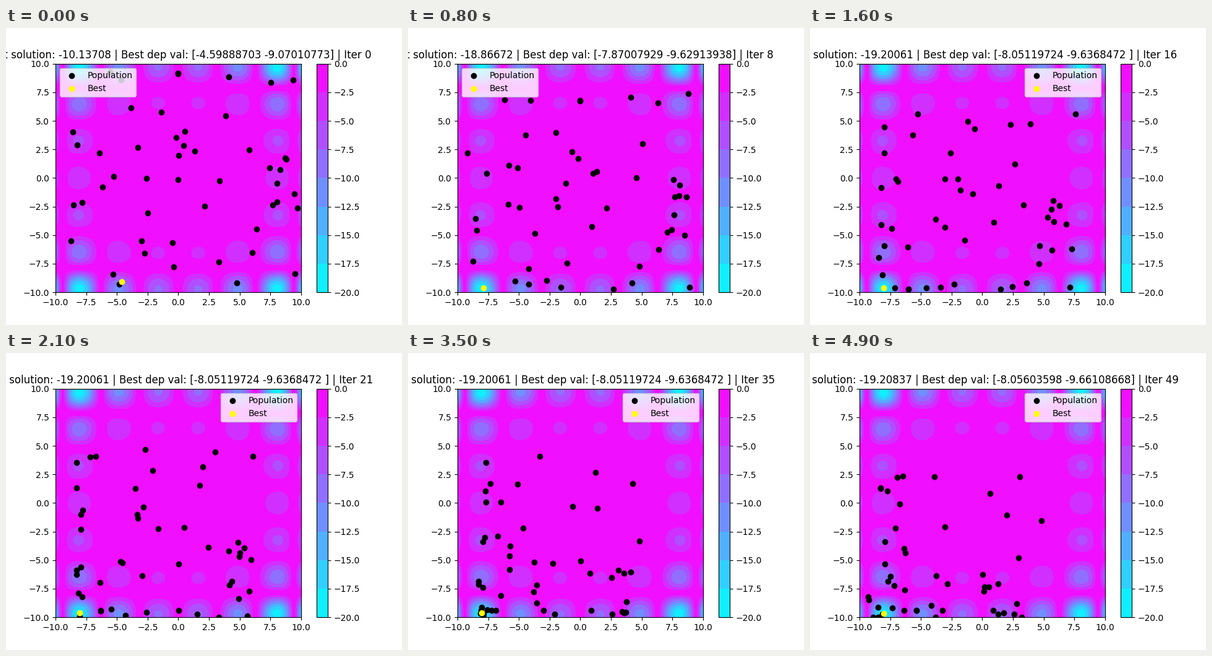
A matplotlib script for the animation above (5 s loop, 640 by 480 pixels).

```python
import matplotlib.pyplot as plt
import numpy as np
from matplotlib.animation import FuncAnimation

FRAMES = 50
DOTS = 50
STEP = 0.3

# (first iteration, best value, best position)
BESTS = [
    (0, -10.13708, (-4.59888703, -9.07010773)),
    (8, -18.86672, (-7.87007929, -9.62913938)),
    (11, -19.20061, (-8.05119724, -9.6368472)),
    (46, -19.20837, (-8.05603598, -9.66108668)),
]


def holder_table(x, y):
    return -np.abs(np.sin(x) * np.cos(y)
                   * np.exp(np.abs(1 - np.hypot(x, y) / np.pi)))


def best_at(i):
    return [b for b in BESTS if b[0] <= i][-1]


def simulate():
    """Step every dot towards the best, with wrong turns that grow commoner."""
    rng = np.random.default_rng(4)
    dots = rng.uniform(-10, 10, (DOTS, 2))
    dots[0] = np.array(BESTS[0][2]) - 0.2  # the dot that found the first best
    path = [dots]
    for i in range(1, FRAMES):
        wrong = 0.05 + 0.37 * i / FRAMES
        # The sideways pull stays weak until a second best is found.
        chance = (0.4, wrong) if i <= BESTS[1][0] else (wrong, wrong)
        turn = np.where(rng.random((DOTS, 2)) < chance, -1, 1)
        heading = np.sign(np.array(best_at(i)[2]) - dots)
        dots = np.clip(dots + STEP * turn * heading, -10, 10)
        path.append(dots)
    return path


PATH = simulate()

plt.rcParams["font.family"] = "DejaVu Sans"
fig, ax = plt.subplots(figsize=(6.4, 4.8), dpi=100)
axis = np.linspace(-10, 10, 100)
X, Y = np.meshgrid(axis, axis)
surface = ax.contourf(X, Y, holder_table(X, Y),
                      levels=np.arange(-20, 0.1, 2.5), cmap="cool")
fig.colorbar(surface, ax=ax)
population = ax.scatter(*PATH[0].T, color="black", label="Population")
best_dot = ax.scatter(*BESTS[0][2], color="yellow", label="Best")
ax.set(xlim=(-10, 10), ylim=(-10, 10))
legend = ax.legend(loc="upper left")
title = ax.set_title("")


def update(i):
    _, value, position = best_at(i)
    population.set_offsets(PATH[i])
    best_dot.set_offsets([position])
    legend.set_loc("upper left" if i < 10 else "upper right")
    title.set_text(f"Best solution: {value:.5f} | "
                   f"Best dep val: {np.array(position)} | Iter {i}")
    return population, best_dot, legend, title


anim = FuncAnimation(fig, update, frames=FRAMES, interval=100,
                     repeat=True, repeat_delay=0)
plt.show()
```
